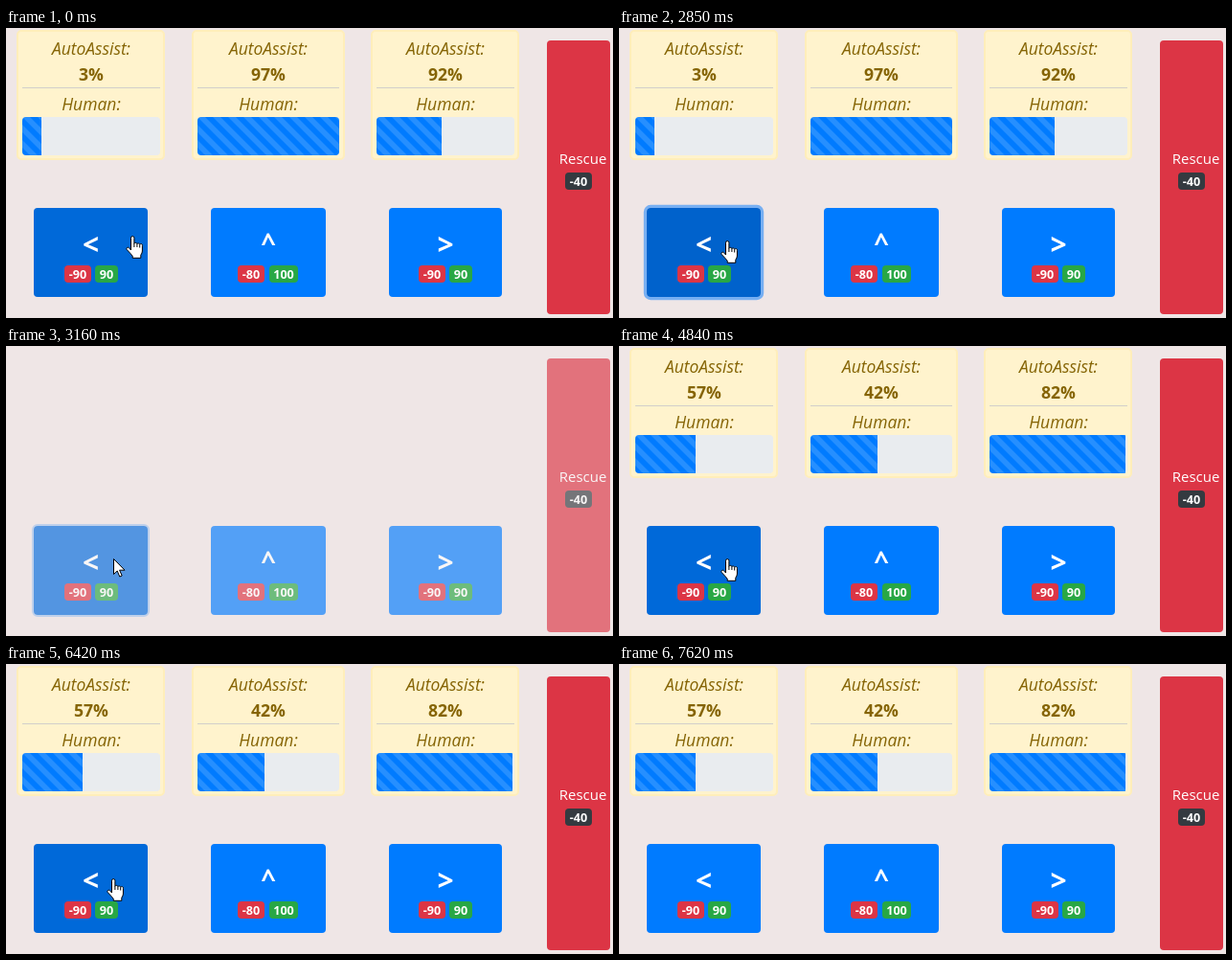
These frames come from a looping animation (634x303 px, 7990 ms). An HTML page:

```html
<!DOCTYPE html>
<html lang="en">
<head>
<meta charset="utf-8">
<title>AutoAssist</title>
<style>
html, body { margin: 0; width: 100%; height: 100%; overflow: hidden; background: #efe6e6; }
svg { display: block; }
text { font-family: "Open Sans", "Noto Sans", sans-serif; text-anchor: middle; fill: #fff; }
.label { font-size: 17.5px; font-style: italic; fill: #856404; }
.value { font-size: 17.6px; font-weight: 700; fill: #856404; }
.badge { font-size: 12.6px; font-weight: 700; }
.sign { font-weight: 700; }
</style>
</head>
<body>
<svg id="stage" width="634" height="303" viewBox="0 0 634 303"></svg>
<script>
const LOOP = 7990;
const RED = '#dc3545', GREEN = '#28a745', DARK = '#343a40', BLUE = '#007bff';
const HOVER = '#0069d9', PRESSED = '#0062cc';

const rect = (x, y, w, h, fill, more = '') =>
  `<rect x="${x}" y="${y}" width="${w}" height="${h}" rx="4" fill="${fill}" ${more}/>`;
const text = (x, y, cls, str, more = '') =>
  `<text x="${x}" y="${y}" class="${cls}" ${more}>${str}</text>`;
const badge = (x, y, w, fill, str) =>
  rect(x, y, w, 18, fill) + text(x + w / 2, y + 14.2, 'badge', str);

// x, width, bar x, bar width
const cards = [[11, 155, 17, 144], [194, 160, 200, 148], [381, 155, 387, 144]];
const card = ([x, w, bx, bw], i) => {
  const mid = bx + bw / 2;
  return rect(x + 1, 3, w - 2, 134, '#fff3cd', 'stroke="#ffeeba" stroke-width="2"') +
    text(mid, 28, 'label', 'AutoAssist:') +
    text(mid, 55, 'value', '', `id="value${i}"`) +
    `<path d="M${bx} 62.5h${bw}" stroke="#d2cfca"/>` +
    text(mid, 86, 'label', 'Human:') +
    `<g transform="translate(${bx} 93)">
      <clipPath id="clip${i}">${rect(0, 0, bw, 40, '#000')}</clipPath>
      ${rect(0, 0, bw, 40, '#e9ecef')}
      <g clip-path="url(#clip${i})">
        <rect class="bar${i}" height="40" fill="${BLUE}"/>
        <rect class="bar${i}" height="40" fill="url(#stripes)"/>
      </g>
    </g>`;
};

// x, width, sign, sign size, sign baseline, cost x, cost, gain x, gain width, gain
const buttons = [
  [29, 119, '&lt;', 30, 237, 61, -90, 93, 24, 90],
  [214, 120, '^', 27.5, 234, 242, -80, 275, 30, 100],
  [400, 118, '&gt;', 30, 237, 431, -90, 463, 24, 90]
];
const button = ([x, w, sign, size, base, cx, cost, gx, gw, gain], i) =>
  rect(x, 188, w, 93, BLUE, `id="button${i}"`) +
  text(x + w / 2, base, 'sign', sign, `font-size="${size}"`) +
  badge(cx, 248, 28, RED, cost) + badge(gx, 248, gw, GREEN, gain);

const stage = document.getElementById('stage');
stage.innerHTML = `
  <defs><pattern id="stripes" width="16" height="16" patternUnits="userSpaceOnUse">
    <path d="M0 0h8l8 8v8zM0 8v8h8z" fill="#fff" fill-opacity=".15"/>
  </pattern></defs>
  <g id="cards">${cards.map(card).join('')}</g>
  <g id="controls">
    <path id="ring" fill="${BLUE}" fill-rule="evenodd"/>
    ${buttons.map(button).join('')}
    ${rect(565, 13, 66, 286, RED)}
    ${text(602.5, 142, '', 'Rescue', 'font-size="15"')}
    ${badge(584, 151, 28, DARK, -40)}
  </g>
  <g id="hand" fill="#fff" stroke="#000" stroke-linejoin="round">
    <path d="M5.5 15V2.3a1.7 1.7 0 0 1 3.4 0V8.2a1.6 1.6 0 0 1 3 .6a1.5 1.5 0 0 1 2.8 .8a1.4 1.4 0 0 1 2.7 1V16q0 2-1.6 4.2V23.3H7.2V21.2Q5 18.5 1.2 14.5C.2 12.8 2.3 11.4 3.6 12.8Z"/>
    <path d="M8.9 8v4M11.9 9v3M14.7 10v2.5" fill="none"/>
  </g>
  <path id="arrow" transform="translate(112 222)" fill="#fff" stroke="#000"
    d="M.5 .5V16.5L4.2 13L6.8 19L9.2 18L6.6 12.2H12Z"/>`;

const rounds = [
  { values: [3, 97, 92], widths: [20, 148, 68] },
  { values: [57, 42, 82], widths: [63, 70, 142] }
];

// Each step changes only the listed properties.
const steps = [
  [0, { round: 0, hand: [125, 217], fill: HOVER, ring: 0, busy: false }],
  [120, { hand: [113, 220] }],
  [270, { hand: [106, 222] }],
  [2850, { fill: PRESSED, ring: 3.2 }],
  [3160, { hand: null, fill: '#006bdf', ring: 2, busy: true }],
  [3310, { fill: BLUE, ring: 0 }],
  [4840, { round: 1, hand: [106, 222], fill: HOVER, busy: false }],
  [6420, { hand: [105, 224] }],
  [6540, { hand: [102, 229] }],
  [6690, { hand: [101, 231] }],
  [7500, { hand: null, fill: '#0072ec' }],
  [7620, { fill: BLUE }]
];

const el = id => document.getElementById(id);
const set = (node, name, value) => node.setAttribute(name, value);
const show = (id, on) => set(el(id), 'visibility', on ? 'visible' : 'hidden');

function roundedBox(x, y, w, h, r) {
  const arc = (dx, dy) => `a${r} ${r} 0 0 1 ${dx} ${dy}`;
  return `M${x + r} ${y}h${w - 2 * r}${arc(r, r)}v${h - 2 * r}${arc(-r, r)}` +
    `h${2 * r - w}${arc(-r, -r)}v${2 * r - h}${arc(r, -r)}z`;
}

function draw(s) {
  show('cards', !s.busy);
  set(el('controls'), 'opacity', s.busy ? 0.65 : 1);
  rounds[s.round].values.forEach((v, i) => { el('value' + i).textContent = v + '%'; });
  rounds[s.round].widths.forEach((w, i) =>
    stage.querySelectorAll('.bar' + i).forEach(bar => set(bar, 'width', w)));

  const lit = s.fill !== BLUE;
  const main = el('button0');
  set(main, 'fill', s.fill);
  main.style.clipPath = '';
  show('ring', s.ring > 0 && lit);
  const g = s.ring;
  set(el('ring'), 'd', roundedBox(29 - g, 188 - g, 119 + 2 * g, 93 + 2 * g, 4 + g) +
    roundedBox(29, 188, 119, 93, 4));
  set(el('ring'), 'fill-opacity', g / 6.4);

  show('hand', s.hand);
  if (s.hand) set(el('hand'), 'transform', `translate(${s.hand})`);
  show('arrow', s.busy);
}

let last = -1;
function tick() {
  const t = performance.now() % LOOP;
  const now = steps.filter(([at]) => at <= t);
  if (now.length !== last) {
    last = now.length;
    draw(Object.assign({}, ...now.map(([, change]) => change)));
  }
  requestAnimationFrame(tick);
}
tick();
</script>
</body>
</html>
```
